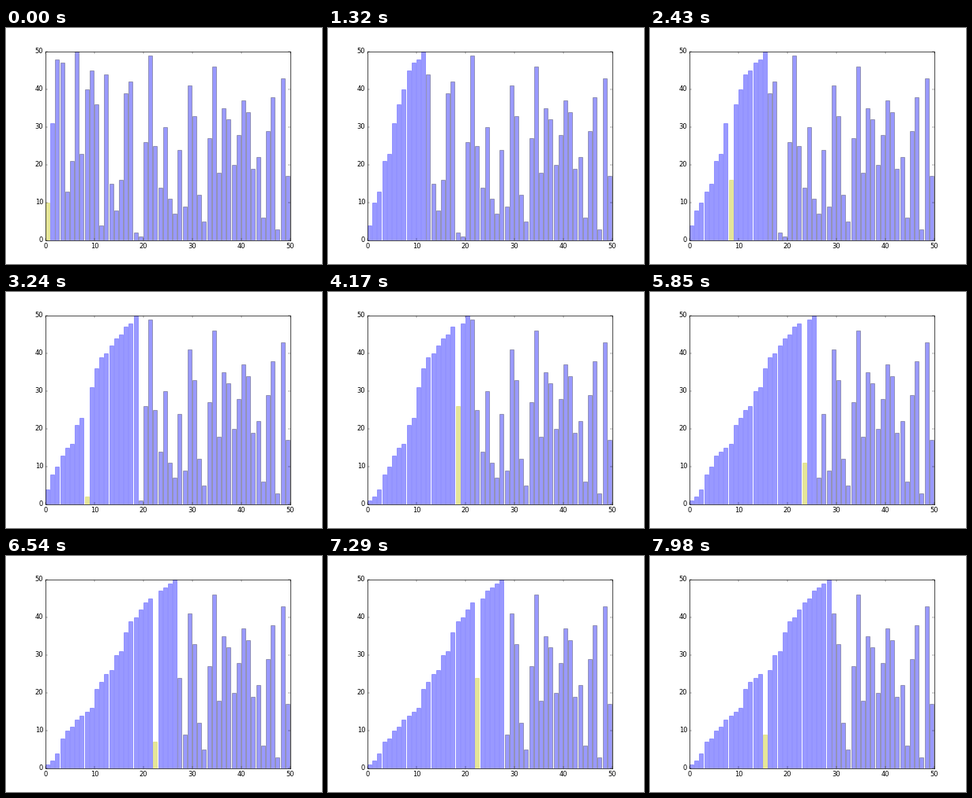
These frames come from a looping animation (400x300 px, 8 s). A matplotlib script:

```python
import matplotlib.pyplot as plt
from matplotlib.animation import FuncAnimation

plt.style.use("classic")
plt.rcParams.update({
    "font.family": "DejaVu Sans",
    "figure.facecolor": "white",
    "savefig.facecolor": "white",
    "savefig.dpi": "figure",
    "ytick.alignment": "center",
})

# the unsorted input, a shuffle of 1 to 50
VALUES = [31, 10, 48, 47, 13, 21, 50, 23, 40, 45,
          36, 4, 44, 15, 8, 16, 39, 42, 2, 1,
          26, 49, 25, 14, 30, 11, 7, 24, 9, 41,
          33, 12, 5, 27, 46, 18, 35, 32, 20, 28,
          37, 34, 19, 22, 6, 29, 38, 3, 43, 17]
LOOP, TICK, STEP = 8000, 20, 30  # milliseconds


def sort_states(values):
    """Yield (heights, active bar, last visited bar) for an insertion sort."""
    a = list(values)
    for i in range(1, len(a)):
        j = i
        while j > 0 and a[j - 1] > a[j]:
            a[j - 1], a[j] = a[j], a[j - 1]
            j -= 1
            yield a[:], j, i
        yield a[:], None, i


states = list(sort_states(VALUES))

fig = plt.figure(figsize=(8, 6), dpi=50)
ax = fig.add_axes([0.125, 0.1, 0.775, 0.8])
bars = ax.bar(range(len(VALUES)), VALUES, width=0.8, align="edge",
              color="b", edgecolor="k", linewidth=1, alpha=0.4)
ax.set(xlim=(0, 50), ylim=(0, 50),
       xticks=range(0, 51, 10), yticks=range(0, 51, 10))


def draw(frame):
    heights, active, visited = states[(frame * TICK + TICK // 2) // STEP]
    for k, (bar, height) in enumerate(zip(bars, heights)):
        fill = "y" if k == active else "b"
        bar.set_height(height)
        bar.set_facecolor(fill)
        # visited bars lose their black outline
        bar.set_edgecolor(fill if k <= visited else "k")
    return list(bars)


anim = FuncAnimation(fig, draw, frames=LOOP // TICK, interval=TICK,
                     init_func=lambda: draw(0), repeat=True, repeat_delay=0)
plt.show()
```
